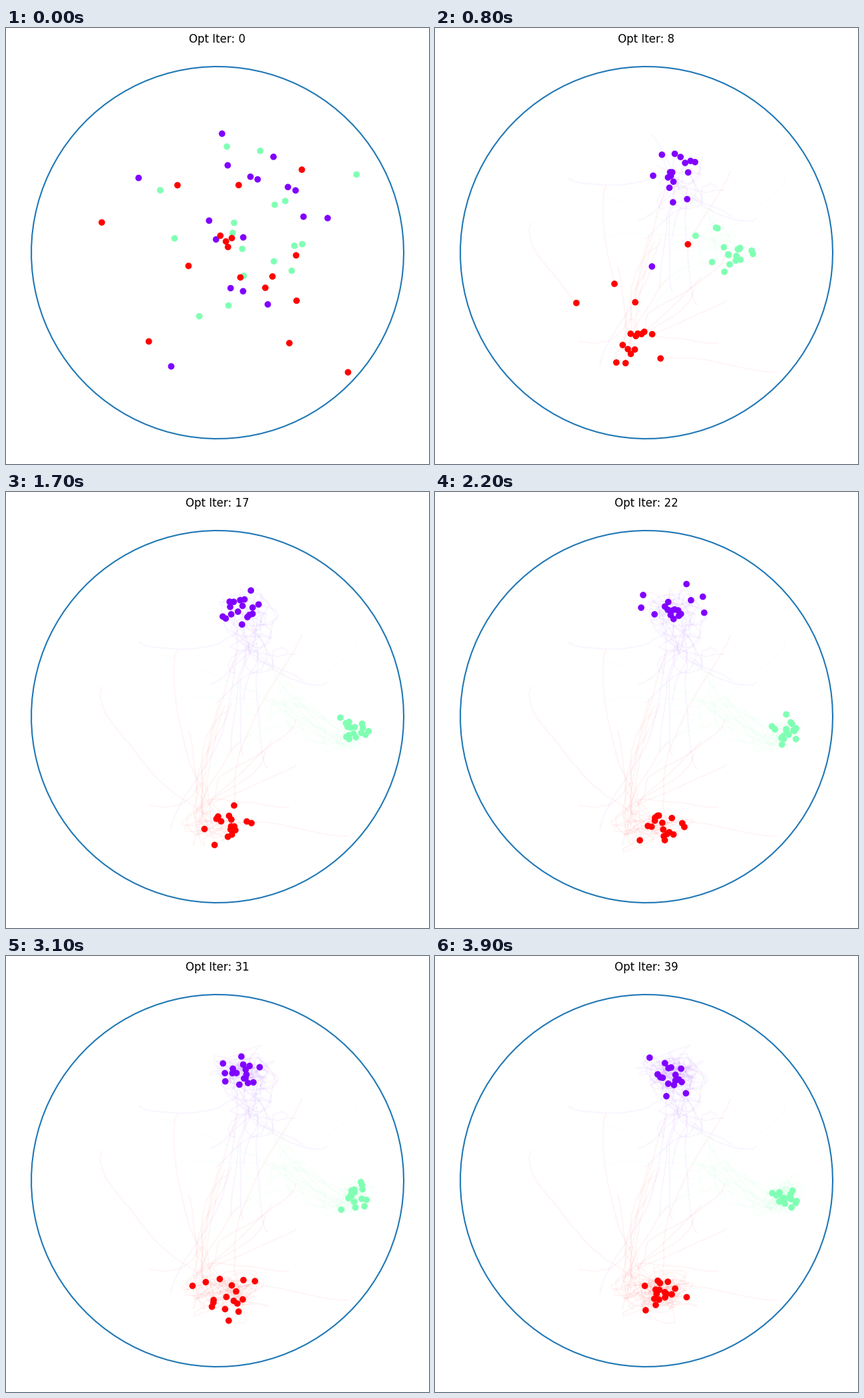
A matplotlib script for the animation above (6900 ms loop, 636 px wide and 656 px high).

```python
import numpy as np
import matplotlib.pyplot as plt
from matplotlib.animation import FuncAnimation
from matplotlib.collections import LineCollection

W, H, DPI = 636, 656, 100
STEPS, FRAMES, INTERVAL = 40, 69, 100
PER_GROUP = 17

# Each group's colour, scatter and cluster centre at the key steps (pixels)
KEYS = [5, 12, 18, 39]
GROUPS = [
    ("#8000ff", (21, 15), [(371, 250), (364, 177), (360, 171), (355, 176)]),
    ("#80ffb4", (12, 13), [(415, 318), (493, 375), (526, 362), (525, 358)]),
    ("#ff0000", (22, 18), [(283, 468), (302, 500), (345, 503), (338, 508)]),
]


def per_point(rows):
    return np.repeat(np.array(rows), PER_GROUP, axis=0)


def centres(k):
    tracks = [np.array(track).T for _, _, track in GROUPS]
    return per_point([[np.interp(k, KEYS, axis) for axis in t] for t in tracks])


def scatter_start(rng, n):
    """A loose cloud stretched to fill its bounding box."""
    low, high = np.array([144, 159]), np.array([527, 518])
    cloud = rng.normal(0, 1, (n, 2))
    cloud = (cloud - cloud.min(0)) / np.ptp(cloud, axis=0)
    return low + cloud * (high - low)


def simulate(seed=4):
    """Points chase jittering goals with momentum and a speed limit."""
    rng = np.random.default_rng(seed)
    n = PER_GROUP * len(GROUPS)
    spread = per_point([s for _, s, _ in GROUPS])
    limit = rng.triangular(10, 26, 29, (n, 1))
    pos = scatter_start(rng, n)
    vel = rng.normal(0, 10, (n, 2))
    jitter = rng.normal(0, 1, (n, 2))
    path = [pos]
    for k in range(1, STEPS):
        jitter = 0.5 * jitter + 0.87 * rng.normal(0, 1, (n, 2))
        gap = centres(k + 1) + jitter * spread - pos
        dist = np.hypot(gap[:, :1], gap[:, 1:])
        pull = gap * np.minimum(1, limit / np.maximum(dist, 1e-6))
        vel = 0.5 * vel + 0.5 * pull
        pos = pos + vel
        path.append(pos)
    return np.array(path)


path = simulate()
colors = per_point([c for c, _, _ in GROUPS])

fig = plt.figure(figsize=(W / DPI, H / DPI), dpi=DPI, facecolor="white")
ax = fig.add_axes([10 / W, 10 / H, 616 / W, 616 / H])
ax.set_xlim(10, 626)
ax.set_ylim(646, 30)
ax.axis("off")

angle = np.linspace(0, 2 * np.pi, 100)
ax.plot(318 + 280 * np.cos(angle), 338 + 280 * np.sin(angle), color="#1f77b4", lw=1.5)
trails = LineCollection([], colors=colors, linewidths=1.5, alpha=0.04, zorder=2)
ax.add_collection(trails, autolim=False)
dots = ax.scatter(path[0, :, 0], path[0, :, 1], c=colors, s=36, zorder=3)
title = ax.set_title("Opt Iter: 0", x=0.4992, fontsize=12, fontfamily="DejaVu Sans")


def draw(frame):
    k = min(frame, STEPS - 1)
    trails.set_segments(path[:k + 1].transpose(1, 0, 2) if k else [])
    dots.set_offsets(path[k])
    title.set_text(f"Opt Iter: {k}")
    return trails, dots, title


anim = FuncAnimation(fig, draw, frames=FRAMES, interval=INTERVAL, repeat=True)
plt.show()
```
